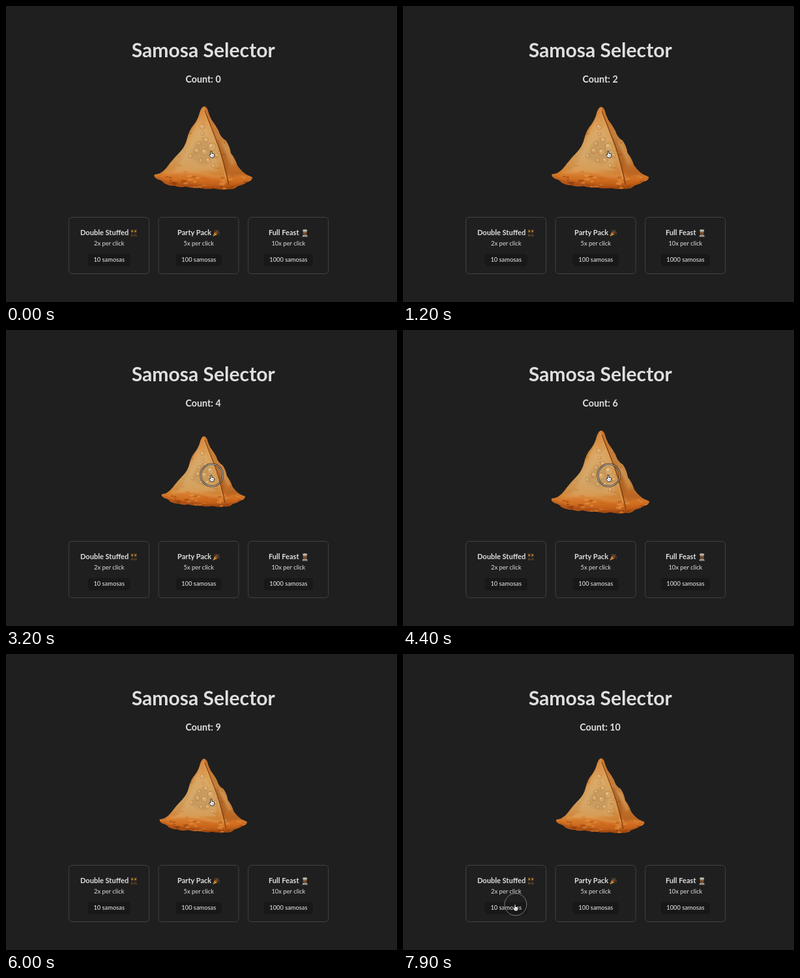
These frames come from a looping animation (600 by 456 pixels, 8000 ms). An HTML page:

```html
<!DOCTYPE html>
<html lang="en">
<head>
<meta charset="utf-8">
<title>Samosa Selector</title>
<style>
  html, body { margin: 0; width: 100%; height: 100%; overflow: hidden; background: #1f1f1f; }
  svg { display: block; width: 600px; height: 456px; }
  text { font-family: Lato, "Open Sans", sans-serif; fill: #dfdfdf; }
  .mid { text-anchor: middle; }
  .bold { font-weight: 700; }
</style>
</head>
<body>
<svg viewBox="0 0 600 456">
  <defs>
    <linearGradient id="crust" x1="0" y1="0" x2="0" y2="1">
      <stop offset="0" stop-color="#d58339"/>
      <stop offset=".25" stop-color="#dba15a"/>
      <stop offset=".6" stop-color="#cf9e5d"/>
      <stop offset=".8" stop-color="#d18436"/>
      <stop offset="1" stop-color="#b14c13"/>
    </linearGradient>
    <linearGradient id="side" x1="0" y1="0" x2="0" y2="1">
      <stop offset="0" stop-color="#c66d26"/>
      <stop offset=".5" stop-color="#c48441"/>
      <stop offset=".75" stop-color="#bd6a26"/>
      <stop offset="1" stop-color="#a84c13"/>
    </linearGradient>
    <linearGradient id="rim" x1="0" y1="0" x2="0" y2="1">
      <stop offset="0" stop-color="#d98435"/>
      <stop offset=".4" stop-color="#cf6a1d"/>
      <stop offset="1" stop-color="#98400f"/>
    </linearGradient>
    <filter id="soft" x="-30%" y="-30%" width="160%" height="160%"><feGaussianBlur stdDeviation="2"/></filter>
    <filter id="fine" x="-30%" y="-30%" width="160%" height="160%"><feGaussianBlur stdDeviation=".7"/></filter>
    <path id="shape" d="M303 155Q300 156 297.5 163Q295 174 289 182Q281 191 278 204Q275 217 266 226Q256 236 248 247Q243 254 236 258L228 260Q226 263 233 267Q239 268 243 273Q250 277 259 277Q267 280 276 278Q286 281 297 280Q307 283 319 281Q331 284 342 282Q350 283 356 277Q365 275 370 271Q378 269 378 264Q374 262 369 260Q361 255 355 246Q351 234 345 227Q343 215 337 207Q329 203 326 192Q321 183 315 175Q311 167 309 159Q306 154 303 155Z"/>
    <clipPath id="clip"><use href="#shape"/></clipPath>
  </defs>

  <text class="mid bold" x="302.7" y="79" font-size="30.1">Samosa Selector</text>
  <text id="count" class="mid bold" x="302.6" y="118" font-size="14.3"></text>

  <g id="samosa">
    <use href="#shape" fill="url(#crust)"/>
    <g clip-path="url(#clip)">
      <path d="M304 154Q313 178 322 202Q333 231 342 285L385 285L350 205L312 150Z" fill="url(#side)"/>
      <g filter="url(#soft)">
        <path d="M298 180Q284 205 272 232Q264 248 254 256Q285 256 325 254Q324 225 309 191Z" fill="#dcb274" opacity=".5"/>
        <path d="M301 205Q285 212 282 235L305 246Q318 235 318 213Z" fill="#bd935a" opacity=".55"/>
        <path d="M296 158Q287 185 271 209Q257 234 235 255" fill="none" stroke="#bd6824" stroke-width="5"/>
        <path d="M326 205Q338 222 341 250L336 256Q334 232 323 205Z" fill="#a7591f" opacity=".7"/>
        <path d="M332 210Q343 226 349 244" fill="none" stroke="#d7a05d" stroke-width="4" opacity=".7"/>
        <path d="M225 260Q241 253 254 258Q281 255 301 261Q323 264 340 262Q361 259 382 261L380 290H225Z" fill="url(#rim)"/>
        <path d="M246 257Q277 252 304 259T342 261" fill="none" stroke="#e5a256" stroke-width="3" opacity=".7"/>
        <path d="M226 264Q246 274 266 275T298 279T336 281T379 268" fill="none" stroke="#87360b" stroke-width="4" opacity=".55"/>
      </g>
      <g id="flecks" filter="url(#fine)"></g>
      <path d="M305 161Q313 181 321 202Q333 231 342 276" fill="none" stroke="#84400f" stroke-width="1.5" filter="url(#fine)"/>
      <path d="M303 160Q311 184 319 207Q330 236 338 267" fill="none" stroke="#e3a55b" stroke-width="1.6" opacity=".6" filter="url(#fine)"/>
      <g id="blisters" filter="url(#fine)"></g>
    </g>
  </g>

  <g id="cards"></g>

  <g id="pointer">
    <g id="ring" fill="none">
      <circle r="17" cy="-4.6" stroke="#151515" stroke-width="2.8" opacity=".7"/>
      <circle r="17" cy="-4.6" stroke="#ccc" stroke-width="1"/>
    </g>
    <path d="M-1.8 -4.3Q-.7 -5.3 .2 -4.2V-1.1L3 -.6Q4 -.3 3.9 .8L3.6 3.2L2.9 5.4H-1.3L-3.6 2.1Q-4.3 .9 -3.4 .4Q-2.6 .2 -1.8 1.2Z" fill="#fff" stroke="#111" stroke-width=".9" stroke-linejoin="round"/>
    <path d="M.2 1.7V3.7M1.6 1.7V3.7" stroke="#333" stroke-width=".5"/>
  </g>
</svg>
<script>
const $ = id => document.getElementById(id);
const LOOP = 8000, STEP = 100, HOLD = 270, EASE = 250;
const HOVER = 1, DOWN = .85, REST = .9;
const presses = [130, 780, 1580, 2390, 3000, 3690, 4390, 5030, 5680, 6330];
const lastPress = 7920;

// Icons use a 12 by 12 box.
const dancer = x => `<g transform="translate(${x})">
  <path d="M1.4 3L1 .4M3.4 3L3.8 .4" stroke="#8f6527" stroke-width=".8"/>
  <circle cx="2.4" cy="3.2" r="1.7" fill="#b67a2e"/>
  <path d="M.7 5L2.4 6.8L4.2 5M1.6 8L1 11.4M3.2 8L3.9 11.4" fill="none" stroke="#9c652a" stroke-width=".9"/>
  <path d="M1.2 5H3.6L3.5 8.5H1.4Z" fill="#2e251c"/></g>`;
const icons = {
  dancers: dancer(.8) + dancer(6),
  popper: `<path d="M.5 11.5L3.7 3.8L8.1 8.2Z" fill="#d9973c"/>
    <path d="M2.2 7.5L4.5 9.8M3.2 5L6.8 8.7" stroke="#a05c25" stroke-width=".9"/>
    <ellipse cx="5.9" cy="6" rx="1.3" ry="3" transform="rotate(-45 5.9 6)" fill="#7a4520"/>
    <path d="M5.5 5Q7 3.3 5.7 1M7 6Q9 4.5 11.4 5.8" fill="none" stroke="#b95a3a" stroke-width="1"/>
    <path d="M7 4.6L10 1.5" stroke="#b8893c" stroke-width="1"/>
    <circle cx="3" cy="2" r=".7" fill="#4c7590"/><circle cx="10.5" cy="8.5" r=".7" fill="#5f844d"/>`,
  cook: `<path d="M1.6 12Q1.8 8.8 6 8.8T10.4 12Z" fill="#a5a29c"/>
    <path d="M3 3.5H9V7Q8.5 9.7 6 9.7T3 7Z" fill="#8a5a36"/>
    <path d="M3.2 3.9L2.2 1.8Q2.4 .2 4 .6Q6 -.5 8 .6Q9.6 .2 9.8 1.8L8.8 3.9Z" fill="#b9b5ac"/>
    <path d="M4.2 7.4Q6 6.5 7.8 7.4" stroke="#3d291d" stroke-width=".9" fill="none"/>
    <path d="M6 10V12" stroke="#666" stroke-width=".6"/>`
};

const cards = [
  ["Double Stuffed", "dancers", 2, 10, 114, 190.7, 65],
  ["Party Pack", "popper", 5, 100, 263, 317, 70],
  ["Full Feast", "cook", 10, 1000, 403, 453, 75]
];
$("cards").innerHTML = cards.map(([name, icon, gain, cost, textX, iconX, width], i) => {
  const mid = 158.2 + i * 137.6;
  return `<rect x="${mid - 61.7}" y="325.5" width="123" height="87" rx="5" fill="none" stroke="#424242"/>
    <text class="bold" x="${textX}" y="353.4" font-size="11.05">${name}</text>
    <g transform="translate(${iconX} 344) scale(.95)">${icons[icon]}</g>
    <text class="mid" x="${mid}" y="368.6" font-size="9.4">${gain}x per click</text>
    <rect x="${mid - width / 2}" y="382" width="${width}" height="19" rx="4.5" fill="#181818"/>
    <text class="mid" x="${mid}" y="394.4" font-size="9.3" font-weight="500">${cost} samosas</text>`;
}).join("");

const blisters = [
  [316, 217, 6], [305, 225, 5], [293, 223, 4], [307, 206, 4], [296, 212, 3],
  [301, 186, 4], [310, 238, 4], [299, 238, 3], [283, 231, 3], [324, 230, 3],
  [302, 197, 2.5], [318, 246, 3]
];
$("blisters").innerHTML = blisters.map(([x, y, r]) =>
  `<circle cx="${x}" cy="${y}" r="${r}" fill="#dcae6d" fill-opacity=".5" stroke="#ad6c2f" stroke-opacity=".5"/>
   <circle cx="${x - r * .3}" cy="${y - r * .35}" r="${r * .35}" fill="#efcf98" opacity=".7"/>`).join("");

// Seeded browning: mostly along the rim, a little over the faces.
let seed = 7;
const random = () => (seed = seed * 16807 % 2147483647) / 2147483647;
$("flecks").innerHTML = Array.from({ length: 110 }, (_, i) => {
  const onRim = i % 3, x = 228 + 150 * random();
  const y = onRim ? 260 + 22 * random() : 165 + 92 * random();
  const color = ["#8c3b0c", "#e9a04e", "#c4651b"][Math.floor(3 * random())];
  return `<ellipse cx="${x}" cy="${y}" rx="${1 + 4 * random()}" ry="${.6 + 1.4 * random()}"
    fill="${color}" opacity="${onRim ? .5 : .25}"/>`;
}).join("");

const clamp = x => Math.min(1, Math.max(0, x));
const smooth = x => x * x * (3 - 2 * x);
const ease = x => smooth(1 - (1 - clamp(x)) ** 1.9);
const mix = (a, b, k) => a + (b - a) * k;

const poses = [[-EASE, HOVER], ...presses.flatMap(p => [[p, DOWN], [p + HOLD, HOVER]]), [7130, REST]];

function scaleAt(t) {
  const i = poses.findLastIndex(([start]) => start <= t);
  const from = i ? poses[i - 1][1] : HOVER;
  return mix(from, poses[i][1], ease((t - poses[i][0]) / EASE));
}

// The ring leads each press slightly and vanishes on release.
function ringAt(t) {
  const press = [...presses, lastPress].find(p => t >= p - 60 && t < p + HOLD);
  return press === undefined ? 0 : clamp((t - press + 60) / 70);
}

function draw(now) {
  const time = now % LOOP, t = time - time % STEP;
  const move = smooth(clamp((t - 6900) / 520));
  $("count").textContent = "Count: " + presses.filter(p => p + HOLD <= t).length;
  $("samosa").setAttribute("transform", `translate(303 214) scale(${scaleAt(t)}) translate(-303 -214)`);
  $("pointer").setAttribute("transform", `translate(${mix(315.8, 172.8, move)} ${mix(228.3, 390.5, move)})`);
  $("ring").setAttribute("opacity", ringAt(t));
}

const start = performance.now();
function tick() {
  draw(performance.now() - start);
  requestAnimationFrame(tick);
}
tick();
</script>
</body>
</html>
```
